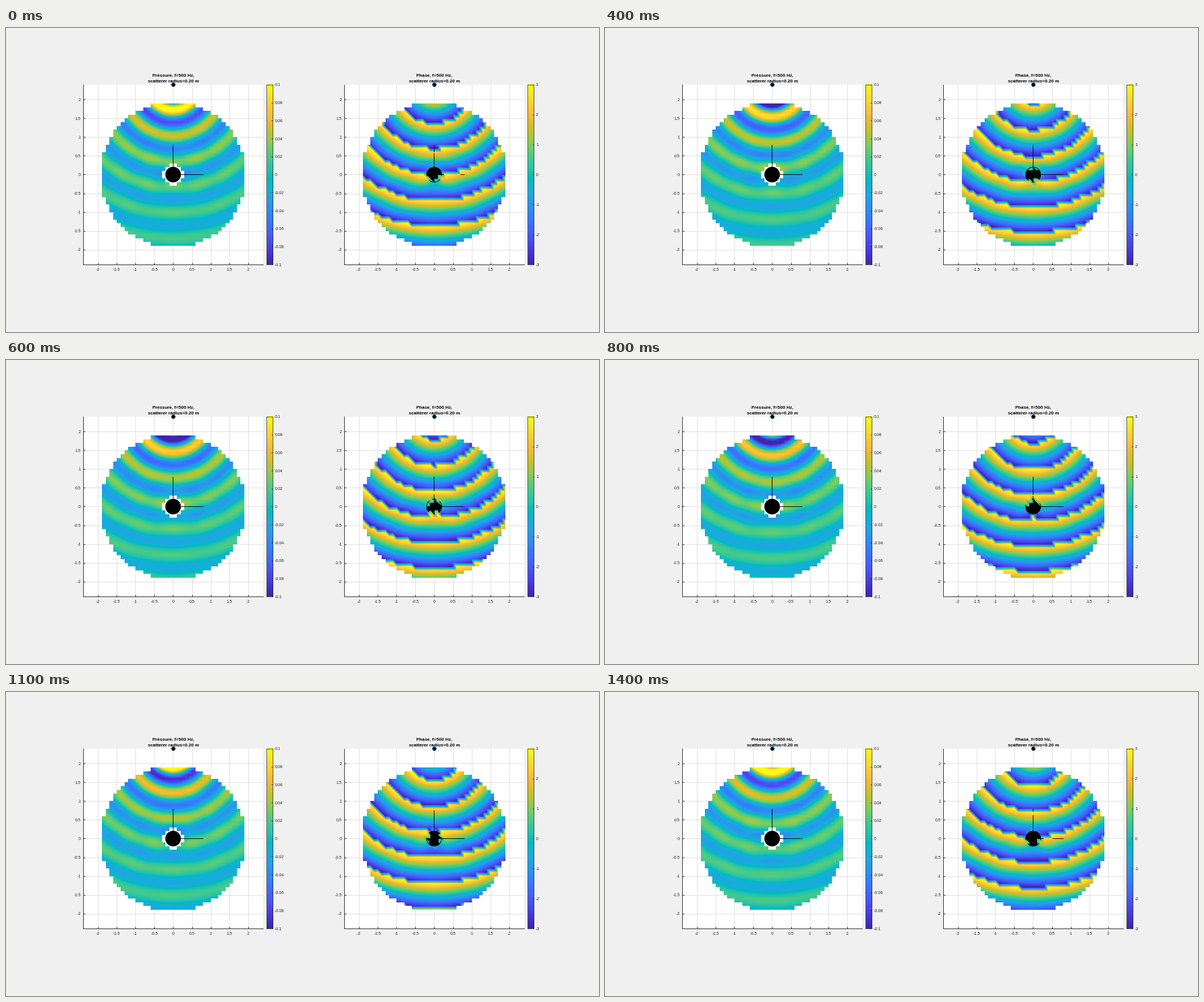
A matplotlib script for the animation above (1500 ms loop, 1045 by 536 pixels).

```python
import numpy as np
import matplotlib.pyplot as plt
from matplotlib.animation import FuncAnimation
from matplotlib.colors import LinearSegmentedColormap
from matplotlib.patches import Circle, Rectangle

W, H, DPI = 1045, 536, 64
PX = 72 / DPI                      # points per pixel
FRAMES, INTERVAL = 15, 100
SCALE, CY = 66.1, 258.5            # pixels per metre, row of y = 0
HALF = 2.4                         # half width of the axes in metres
INK = "#262626"

FREQ, SOUND, RADIUS, SOURCE_Y = 500, 343, 0.2, 2.4
K = 2 * np.pi * FREQ / SOUND

PARULA = LinearSegmentedColormap.from_list("parula", [
    "#3e26a8", "#4332cb", "#4741e5", "#4852f4", "#4563fd", "#3875fe",
    "#2e87f7", "#2797eb", "#20a5e3", "#12b1d6", "#02bac3", "#24c1ae",
    "#37c897", "#57cc7a", "#81cc59", "#abc739", "#d1bf27", "#f0ba36",
    "#fec338", "#fad62d", "#f5e924", "#f9fb15"])

# Heights of the disc, its outline and the axis lines above the plane
DISC_Z, RIM_Z, LINE_Z = 0.05, 0.7, 2.1


def hankel(order, x):
    """Spherical Hankel functions of the second kind, orders 0..order."""
    h = [1j * np.exp(-1j * x) / x]
    h.append(h[0] * (1 / x + 1j))
    for n in range(1, order):
        h.append((2 * n + 1) / x * h[n] - h[n - 1])
    return h


def sound_field(x, y, order=8):
    """Point source plus its scattering from a rigid sphere at the origin."""
    dist = np.hypot(x, y - SOURCE_Y)
    r = np.maximum(np.hypot(x, y), 0.05)
    total = np.exp(-1j * K * dist) / (4 * np.pi * dist)
    ka = K * RADIUS
    h_a, h_r = hankel(order + 1, ka), hankel(order + 1, K * r)
    h_0 = hankel(order + 1, K * SOURCE_Y)
    for n in range(order + 1):
        slope = n / ka * h_a[n] - h_a[n + 1]
        legendre = np.polynomial.legendre.legval(y / r, np.eye(order + 1)[n])
        total = total + (1j * K / (4 * np.pi) * (2 * n + 1)
                         * slope.real / slope * h_r[n] * h_0[n] * legendre)
    return total


steps = np.arange(-20, 21)
gi, gj = np.meshgrid(steps, steps)
ring = gi ** 2 + gj ** 2
field = sound_field(gi / 10, gj / 10)

fig = plt.figure(figsize=(W / DPI, H / DPI), dpi=DPI, facecolor="#f0f0f0")
ax = fig.add_axes([0, 0, 1, 1])
ax.axis("off")


def line(xs, ys, color=INK, width=1.0, z=1):
    """Line through pixel centres, so that it stays sharp."""
    ax.plot(np.ceil(np.array(xs) - 0.5) + 0.5,
            np.ceil(np.array(ys) - 0.5) + 0.5, color=color, lw=width * PX,
            zorder=z, snap=False, solid_capstyle="projecting",
            solid_joinstyle="miter")


def label(x, y, text, ha="center", size=7.3, weight="normal", color=INK):
    ax.text(x, y, text, ha=ha, va="baseline", fontsize=size * PX,
            family="Liberation Sans", weight=weight, color=color, zorder=12)


class Panel:
    def __init__(self, cx, title, limit, ticks, core):
        self.cx, self.limit, self.core = cx, limit, core
        self.frame(title)
        self.colorbar(ticks)
        self.prepare_pixels()
        self.layers = []
        for level, z in ((-9, 3), (DISC_Z, 5), (RIM_Z, 7), (LINE_Z, 9)):
            image = ax.imshow(np.zeros(self.u.shape), cmap=PARULA,
                              vmin=-limit, vmax=limit, extent=self.extent,
                              interpolation="nearest", aspect="auto", zorder=z)
            self.layers.append((level, image))
        self.scatterer()

    def frame(self, title):
        cx, half = self.cx, HALF * SCALE
        left, right, top, bottom = cx - half, cx + half, CY - half, CY + half
        ax.add_patch(Rectangle((left, top), 2 * half, 2 * half,
                               fc="white", ec="none", zorder=0))
        for v in np.arange(-2, 2.1, 0.5):
            x, y = cx + v * SCALE, CY - v * SCALE
            line([x, x], [top, bottom], "#dedede")
            line([left, right], [y, y], "#dedede")
            line([x, x], [bottom, bottom - 3], z=2)
            line([left, left + 3], [y, y], z=2)
            label(x, 428.3, f"{v:g}")
            label(left - 4, y + 2.6, f"{v:g}", "right")
        line([left, left, right], [top, bottom, bottom], z=2)
        for text, y in zip(title, (85.8, 95.9)):
            label(cx + 0.2, y, text, size=8, weight="bold", color="black")

    def colorbar(self, ticks):
        left, right = self.cx + 165, self.cx + 176
        top, bottom = CY - HALF * SCALE, CY + HALF * SCALE
        ax.imshow(np.linspace(1, 0, 256)[:, None], cmap=PARULA, aspect="auto",
                  extent=(left, right, bottom, top), zorder=2)
        line([left, right, right, left, left],
             [top, top, bottom, bottom, top], width=0.8, z=3)
        for v in ticks:
            y = CY - v / self.limit * HALF * SCALE
            line([right - 2, right], [y, y], width=0.8, z=4)
            label(right + 3.5, y + 2.6, f"{v:g}", "left")

    def prepare_pixels(self):
        """Grid cell and position within it for every pixel of the surface."""
        x0, y0, size = int(self.cx) - 128, int(CY) - 128, 257
        self.extent = (x0, x0 + size, y0 + size, y0)
        px = (x0 + np.arange(size) + 0.5 - self.cx) / SCALE * 10 + 20
        py = (CY - y0 - np.arange(size) - 0.5) / SCALE * 10 + 20
        px, py = np.meshgrid(px, py)
        self.col, self.row = px.astype(int), py.astype(int)
        self.u, self.v = px - self.col, py - self.row

    def scatterer(self):
        cx, r, reach = self.cx, RADIUS * SCALE, 0.8 * SCALE
        ax.add_patch(Circle((cx, CY), r, fc="black", ec="none", zorder=4))
        ax.add_patch(Circle((cx, CY), r, fc="none", ec="black",
                            lw=PX, zorder=6))
        line([cx, cx], [CY, CY - reach], "black", z=8)
        line([cx, cx + reach], [CY, CY], "black", z=8)
        ax.add_patch(Circle((cx + 0.4, CY - HALF * SCALE + 0.2), 3.4,
                            fc="black", ec="#0072bd", lw=0.7 * PX, zorder=11))

    def show(self, values):
        """Linear interpolation over cells split from upper left to lower right."""
        g = np.where(ring <= 400, values, np.nan)
        g[ring <= 4] = self.core
        r, c, u, v = self.row, self.col, self.u, self.v
        f00, f10, f01, f11 = g[r, c], g[r, c + 1], g[r + 1, c], g[r + 1, c + 1]
        lower = f00 + u * (f10 - f00) + v * (f01 - f00)
        upper = f11 + (1 - u) * (f01 - f11) + (1 - v) * (f10 - f11)
        surface = np.where(u + v < 1, lower, upper)
        surface[np.isnan(f00 + f10 + f01 + f11)] = np.nan
        for level, image in self.layers:
            image.set_data(np.ma.masked_invalid(
                np.where(surface > level, surface, np.nan)))


SECOND_LINE = "scatterer radius=0.20 m"
pressure = Panel(294.5, ("Pressure, f=500 Hz,", SECOND_LINE), 0.1,
                 np.arange(-5, 6) / 50, core=np.nan)
phase = Panel(754.5, ("Phase, f=500 Hz,", SECOND_LINE), 3,
              np.arange(-3, 4), core=0)
# The pressure disc lies above its whole surface
for _, image in pressure.layers[1:]:
    image.set_visible(False)
ax.set_xlim(0, W)
ax.set_ylim(H, 0)


def update(i):
    wave = field * np.exp(2j * np.pi * i / FRAMES)
    pressure.show(wave.real)
    phase.show(np.angle(wave))
    return []


anim = FuncAnimation(fig, update, frames=FRAMES, interval=INTERVAL,
                     repeat=True, repeat_delay=0)
plt.show()
```
